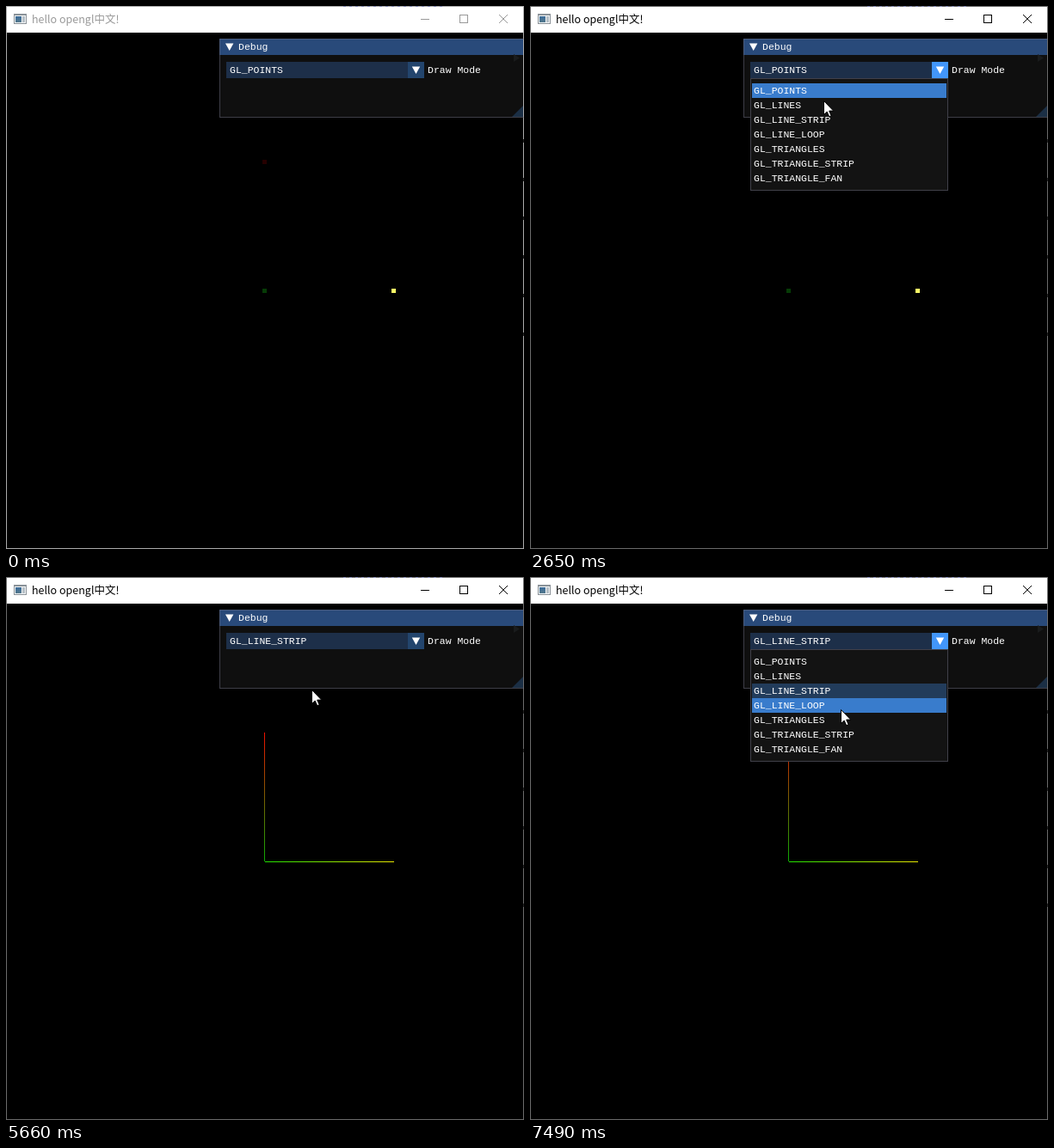
Recreate the animation shown at these times as an HTML page with a canvas. Size 602x632 px, loop 8 s.

```html
<!DOCTYPE html>
<html>
<head>
<meta charset="utf-8">
<style>
html, body { margin: 0; width: 602px; height: 632px; overflow: hidden; background: #000; }
canvas { display: block; }
</style>
</head>
<body>
<canvas id="stage" width="602" height="632"></canvas>
<script>
const ctx = document.getElementById('stage').getContext('2d');
const LOOP = 8000;
const STEP = 100;
const HOVER_LAG = 90;
const MONO = '11.476px "Liberation Mono", monospace';
const TITLE = '12.5px "Noto Sans CJK SC", "Noto Sans CJK", "Noto Sans CJK JP", sans-serif';
const BORDER = 'rgba(110, 110, 128, .5)';
const MODES = ['GL_POINTS', 'GL_LINES', 'GL_LINE_STRIP', 'GL_LINE_LOOP',
  'GL_TRIANGLES', 'GL_TRIANGLE_STRIP', 'GL_TRIANGLE_FAN'];

// Each click opens the list, or picks the next mode and closes it
const CLICKS = [2130, 3050, 3950, 5660, 6580];

const ENTRY = { at: 700, x: 375, y: 234 };
const MOVES = [
  { from: 800, to: 1430, x: 350, y: 89 },
  { from: 1530, to: 1930, x: 368, y: 72 },
  { from: 2550, to: 2650, x: 341, y: 110 },
  { from: 2750, to: 2750, x: 331, y: 116 },
  { from: 3250, to: 3850, x: 395, y: 72 },
  { from: 4050, to: 4270, x: 380, y: 114 },
  { from: 4370, to: 4470, x: 355, y: 131 },
  { from: 5760, to: 6160, x: 402, y: 84 },
  { from: 6270, to: 6380, x: 398, y: 75 },
  { from: 7090, to: 7490, x: 361, y: 154 }
];

function pointerAt(t) {
  if (t < ENTRY.at) return null;
  let { x, y } = ENTRY;
  for (const m of MOVES) {
    if (t < m.from) break;
    const steps = Math.floor((t - m.from) / STEP) + 1;
    const count = Math.floor((m.to - m.from) / STEP) + 1;
    const ease = 1 - (1 - Math.min(1, steps / count)) ** 2;
    x += (m.x - x) * ease;
    y += (m.y - y) * ease;
  }
  return { x: Math.round(x), y: Math.round(y) };
}

function rect(color, x, y, w, h) {
  ctx.fillStyle = color;
  ctx.fillRect(x, y, w, h);
}

function frame(color, x, y, w, h) {
  ctx.strokeStyle = color;
  ctx.lineWidth = 1;
  ctx.strokeRect(x + 0.5, y + 0.5, w - 1, h - 1);
}

function text(str, x, y, color = '#fff', font = MONO) {
  ctx.font = font;
  ctx.fillStyle = color;
  ctx.fillText(str, x, y);
}

function poly(color, ...pts) {
  ctx.beginPath();
  for (let i = 0; i < pts.length; i += 2) ctx.lineTo(pts[i], pts[i + 1]);
  ctx.closePath();
  ctx.fillStyle = color;
  ctx.fill();
}

function downArrow(x, y) {
  poly('#fff', x, y, x + 9.4, y, x + 4.7, y + 8.5);
}

function ramp(x0, y0, x1, y1, first, last) {
  const g = ctx.createLinearGradient(x0, y0, x1, y1);
  g.addColorStop(0, first);
  g.addColorStop(1, last);
  return g;
}

function drawWindow(active) {
  const ink = active ? '#000' : '#999';
  rect('#000', 0, 0, 602, 632);
  rect('#fff', 0, 0, 602, 31);
  frame(active ? '#6a6a6a' : '#aaa', 0, 0, 602, 632);

  // Traces of the desktop along the window edges
  for (let x = 392; x < 510; x += 7) rect('#7c82ae', x, 0, 3, 1);
  for (let y = 155; y < 400; y += 45) rect('#222', 601, y, 1, 4);

  rect('#8a9298', 9, 9, 15, 12);
  rect('#f4f6f7', 10, 11, 13, 9);
  rect(ramp(11, 12, 11, 19, '#3d6e9c', '#53788c'), 11, 12, 7, 7);
  rect('#b5bfc6', 19, 12, 3, 7);
  text('hello opengl中文!', 30, 20, ink, TITLE);

  rect(ink, 482, 15, 10, 1);
  frame(ink, 527, 10, 10, 10);
  ctx.beginPath();
  ctx.moveTo(573, 10);
  ctx.lineTo(583, 20);
  ctx.moveTo(583, 10);
  ctx.lineTo(573, 20);
  ctx.stroke();
}

function drawScene(mode) {
  if (mode === 0) {
    rect('#260000', 298, 179, 5, 5);
    rect('#063c06', 298, 329, 5, 5);
    rect('#ffff66', 448, 329, 5, 5);
    return;
  }
  rect(ramp(0, 181, 0, 331, '#f01000', '#0cac04'), 300, 181, 1, 150);
  if (mode === 2) rect(ramp(301, 0, 451, 0, '#20e000', '#e8e800'), 301, 331, 150, 1);
}

function drawPanel(mode, open, hot) {
  const hovered = !open && hot && hot.y >= 65 && hot.y < 84;
  rect('#0f0f0f', 248, 38, 353, 92);
  rect('#294a7a', 248, 38, 353, 19);
  frame(BORDER, 248, 38, 360, 92);
  poly('#1a1c1d', 590, 56, 597, 60.5, 590, 65);
  poly('#1b2f45', 601, 116, 601, 129, 588, 129);
  downArrow(255, 43.5);
  text('Debug', 270, 51);

  rect(hovered ? '#23456d' : '#1d2f49', 256, 65, 211, 19);
  rect(open || hovered ? '#4296fa' : '#23456d', 467, 65, 19, 19);
  downArrow(471.8, 70.5);
  text(MODES[mode], 260, 78);
  text('Draw Mode', 490, 78);
  if (!open) return;

  rect('#131313', 256, 84, 230, 131);
  frame(BORDER, 256, 84, 230, 131);
  const row = Math.floor((hot.y - 90) / 17);
  MODES.forEach((name, i) => {
    const y = 90 + 17 * i;
    if (i === row) rect('#397ccc', 258, y, 226, 17);
    else if (i === mode) rect('#223c5b', 258, y, 226, 17);
    text(name, 260, y + 12);
  });
}

function drawPointer({ x, y }) {
  ctx.save();
  ctx.translate(x + 0.5, y + 0.5);
  poly('#fff', 0, 0, 0, 16, 3.7, 12.6, 6.2, 18.3, 8.6, 17.2, 6.2, 11.6, 11.2, 11.6);
  ctx.strokeStyle = '#000';
  ctx.lineWidth = 1;
  ctx.stroke();
  ctx.restore();
}

function draw(now) {
  const t = now % LOOP;
  const clicks = CLICKS.filter(at => at <= t).length;
  const mode = clicks >> 1;
  const open = clicks % 2 === 1;
  const pointer = pointerAt(t);
  drawWindow(clicks > 0);
  drawScene(mode);
  drawPanel(mode, open, pointerAt(t - HOVER_LAG));
  if (pointer) drawPointer(pointer);
}

const begin = performance.now();
function tick() {
  draw(performance.now() - begin);
  requestAnimationFrame(tick);
}
tick();
</script>
</body>
</html>
```
